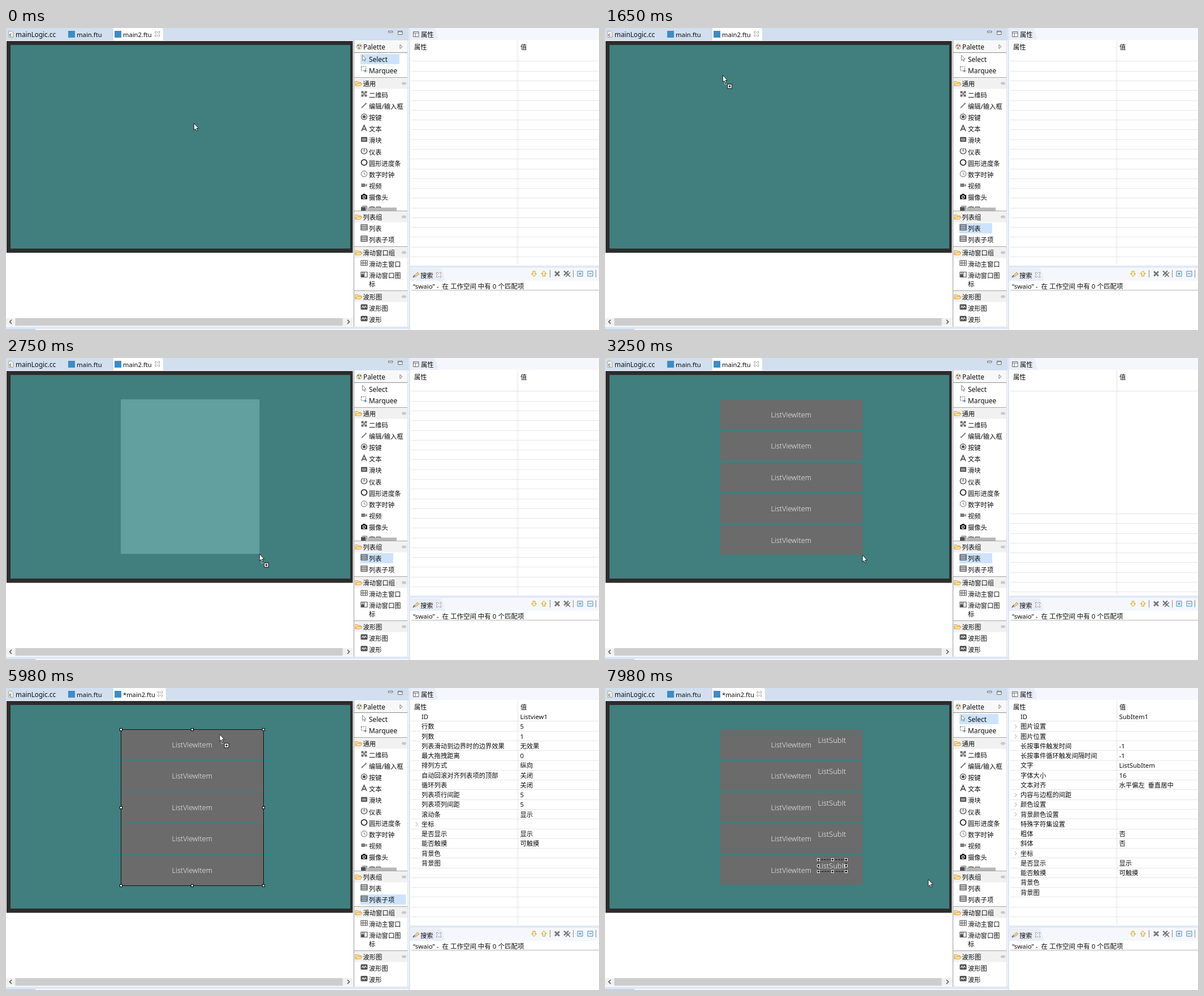
An HTML page that plays this animation: 1049 by 534 pixels, repeating every 8 s.

```html
<!DOCTYPE html>
<html lang="zh-CN">
<head>
<meta charset="utf-8">
<title>List designer</title>
<style>
html, body { margin: 0; width: 100%; height: 100%; overflow: hidden; background: #fff; }
svg { display: block; width: 1049px; height: 534px; }
text { font-family: "Noto Sans", "Noto Sans CJK SC", sans-serif; white-space: pre; fill: #0c0c0c; }
.row text { font-family: "Open Sans", "Noto Sans", sans-serif; font-weight: 300; fill: #fff; }
.handle { fill: #fff; stroke: #000; }
#subSel .handle { fill: #000; stroke: #fff; }
.ic { fill: none; stroke: #505050; stroke-width: 1.1; }
.f { fill: #505050; stroke: none; }
</style>
</head>
<body>
<svg id="stage" viewBox="0 0 1049 534"></svg>
<script>
const LOOP = 8000;
const PITCH = 55.5;
const five = [0, 1, 2, 3, 4];

// ---------- drawing helpers ----------
const rect = (x, y, w, h, fill, more = '') => `<rect x="${x}" y="${y}" width="${w}" height="${h}" fill="${fill}" ${more}/>`;
const text = (x, mid, s, size = 11.3) => `<text x="${x}" y="${mid + 4.5}" font-size="${size}">${s}</text>`;
const path = (d, fill = 'none', stroke = 'none', w = 1) => `<path d="${d}" fill="${fill}" stroke="${stroke}" stroke-width="${w}"/>`;
const hline = (x1, x2, y, c) => path(`M${x1} ${y}H${x2}`, 'none', c);
const vline = (x, y1, y2, c) => path(`M${x} ${y1}V${y2}`, 'none', c);
const at = (x, y, s) => `<g transform="translate(${x} ${y})">${s}</g>`;
const group = (id, s, cls = '') => `<g id="${id}" class="${cls}">${s}</g>`;
const closeMark = path('M-4 -4H-2L0 -2 2 -4H4V-2L2 0 4 2V4H2L0 2 -2 4H-4V2L-2 0 -4 -2Z', '#fff', '#8a8a8a', .9);
const handles = pts => pts.map(([x, y]) => `<rect class="handle" x="${x - 2}" y="${y - 2}" width="4" height="4"/>`).join('');

// ---------- palette icons, centred on 0,0 ----------
const icons = {
  code: '<path class="f" d="M-5 -5h4v4h-4zM1 -5h4v4h-4zM-5 1h4v4h-4zM1 1h4v4h-4zM-1 -2h2v4h-2z" opacity=".85"/>',
  edit: '<path d="M-4 4L3 -3" stroke-width="2.2" stroke="#888"/><path d="M-5 5l1 -3 2 2zM3 -5l2 2 -1 1 -2 -2z" fill="#777" stroke="none"/>',
  button: '<circle r="5" stroke-width="1.3"/><circle class="f" r="2.6"/>',
  letter: '<path d="M-4.5 5L0 -5 4.5 5M-3 1.8H3" stroke-width="1.7"/>',
  slider: '<rect class="f" x="-5.5" y="-4.5" width="11" height="8.5" rx="1"/><path d="M-2.5 -2v4M0 -2v4M2.5 -2v4" stroke="#fff"/>',
  gauge: '<path d="M-2.5 -4.6A5.2 5.2 0 1 0 2.5 -4.6M0 -5.5V1" stroke-width="1.4"/>',
  ring: '<circle r="5" stroke="#111" stroke-width="1.6"/>',
  clock: '<path d="M-2 -5H2L5 -2V2L2 5H-2L-5 2V-2ZM0 -3V0L2.5 1.5" stroke="#888"/>',
  video: '<path d="M-5 -3H2V3H-5ZM2 0L5 -3V3Z" fill="#777" stroke="none"/>',
  camera: '<path d="M-5.5 -3H-3L-2 -5H2L3 -3H5.5V4.5H-5.5Z" fill="#111" stroke="none"/><circle r="2.2" cy=".6" stroke="#fff" stroke-width="1.2"/>',
  windows: '<path class="f" d="M-5.5 -2H3V5H-5.5Z"/><path d="M-3.5 -3.5H4.7V4"/>',
  list: '<path d="M-5.5 -4.5H5.5V4.5H-5.5ZM-5.5 -1.5H5.5M-5.5 1.5H5.5" stroke-width="1.3"/>',
  grid: '<path d="M-5.5 -4.5H5.5V4.5H-5.5ZM-5.5 0H5.5M-2 -4.5V4.5M2 -4.5V4.5" stroke-width="1.2"/>',
  tiles: '<path d="M-5.5 -4.5H5.5V4.5H-5.5ZM-5.5 0H0M0 -4.5V4.5M-2.7 -4.5V4.5" stroke-width="1.2"/><path class="f" d="M-5 0h5v4h-5z"/>',
  wave: '<rect class="f" x="-6" y="-5" width="12" height="9.5" rx="1.5"/><path d="M-4 1.5L-2 -2 0 1.5 2 -2 4 1" stroke="#fff"/>',
  select: '<path d="M-3 -5.5V4L-.8 2 .8 5.5 2.2 4.8 .8 1.6H3.5Z" fill="#fff" stroke="#777" stroke-width=".9"/>',
  marquee: '<path d="M-5 -5H3V2H-5Z" stroke="#666" stroke-dasharray="2 1.5"/><path d="M2 0V5M0 2.5H5" stroke="#3b74b5"/>'
};
const tool = (y, name, icon) => at(633.5, y - 1.5, `<g class="ic">${icons[icon]}</g>`) + text(642, y, name, /[a-z]/.test(name) ? 11.9 : 11.3);
const folder = path('M-6 4V-3.5H-2L-1 -2H3.5V0M-6 4L-3.5 0H6L3.5 4Z', '#fde9b0', '#d79a38');
const pin = path('M-4 0L-1.5 -2.2V2.2ZM4 0L1.5 -2.2V2.2ZM-1.5 -1H1.5M-1.5 1H1.5', '#fff', '#a2a2a2', .8);
const section = (y, name) => rect(616, y - 10.5, 94, 20, '#f1f1f1') + hline(616, 710, y - 10.5, '#a5a5a5') +
  at(624, y, folder) + text(631.5, y, name) + at(704, y, pin);

function palette() {
  const common = '二维码 code|编辑/输入框 edit|按键 button|文本 letter|滑块 slider|仪表 gauge|圆形进度条 ring|数字时钟 clock|视频 video|摄像头 camera|窗口 windows';
  const items = common.split('|').map((s, i) => tool(118 + 20.2 * i, ...s.split(' '))).join('');
  return rect(615, 22, 97, 506, '#fff') + vline(615.5, 22, 528, '#9a9a9a') + vline(710.5, 22, 528, '#dcdcdc') +
    rect(616, 23, 94, 20, '#f8f8f8') + hline(616, 710, 43.5, '#8c8c8c') +
    at(625, 33, '<circle r="4.6" fill="#f3ead6" stroke="#a39a88" stroke-width=".8"/><circle cx="-2" cy="-2" r="1.4" fill="#3c78c0"/><circle cx="2" cy="-1.5" r="1.4" fill="#d1503c"/><circle cx="-.5" cy="2.3" r="1.4" fill="#4f9d4a"/>') +
    text(632, 33, 'Palette', 11.9) + path('M697 29.5L701 33 697 36.5Z', '#fff', '#777') +
    group('hlSelect', rect(627, 46, 69, 18, '#cde3fb')) +
    group('hlList', rect(627, 345, 58, 18, '#cde3fb')) +
    group('hlSub', rect(627, 365, 80.5, 18, '#cde3fb')) +
    tool(55, 'Select', 'select') + tool(75, 'Marquee', 'marquee') +
    section(98, '通用') + items + rect(640, 317.5, 51, 6, '#b7b7b7') + rect(616, 323.5, 94, 6, '#f1f1f1') +
    section(334, '列表组') + tool(354, '列表', 'list') + tool(374, '列表子项', 'list') +
    section(397, '滑动窗口组') + tool(417, '滑动主窗口', 'grid') + tool(437.5, '滑动窗口图', 'tiles') + text(642, 452.5, '标') +
    section(475, '波形图') + tool(495, '波形图', 'wave') + tool(515.5, '波形', 'wave');
}

function editor() {
  return rect(0, 0, 712, 22, '#d1dfef') +
    path('M5 5.5H10L12.5 8V16.5H5Z', '#fff', '#b79a58') + `<text x="6" y="15" font-size="8" style="fill:#2d64ad;font-weight:700">c</text>` +
    text(17, 11, 'mainLogic.cc', 11.7) +
    rect(110, 5, 12, 12, '#3f8cc3') + text(125, 11, 'main.ftu') +
    '<path id="tab" fill="#fff"/>' +
    rect(192, 5, 12, 12, '#3f8cc3') + '<text id="tabName" x="207" y="15.5" font-size="11.2"></text>' +
    group('tabClose', closeMark) +
    path('M676.5 5.5H684V8H676.5Z', '#fff', '#666') + path('M693.5 5.5H701V11.5H693.5ZM693.5 7H701', '#fff', '#666') +
    rect(1, 23, 612.5, 374.5, '#2c2c2c') + rect(8, 30, 601, 360, '#417e7e') +
    rect(0, 513, 614, 13.5, '#f1f1f1') + rect(16.5, 513, 579, 13.5, '#cdcdcd') +
    path('M10 516L6.5 519.5 10 523M604 516L607.5 519.5 604 523', 'none', '#444', 1.4);
}

function sidePanels() {
  const arrow = 'M-2 -4.5H2V0H4.5L0 5 -4.5 0H-2Z';
  const cross = 'M-4 -4L4 4M4 -4L-4 4';
  const box = 'M-4.5 -4.5H4.5V4.5H-4.5ZM-2.5 0H2.5';
  return rect(712, 0, 3, 534, '#dfe7f4') + rect(715, 0, 334, 21, '#f5f7fc') +
    path('M715 21V0H757Q761 0 764 21Z', '#e9eef8') +
    path('M720.5 6.5H730V15.5H720.5ZM720.5 9H730M724 9V15.5', '#fff', '#666') + text(734, 11, '属性') +
    rect(715, 21, 334, 400, '#fff') + text(722, 33, '属性') + text(910, 33, '值') +
    vline(905.5, 22, 418, '#e3e3e3') + hline(717, 1049, 58.5, '#e3e3e3') + '<path id="gridLines" fill="none" stroke="#e6e6e6"/>' +
    rect(712, 420, 337, 4, '#e2e9f5') + rect(715, 424, 334, 23, '#f5f7fc') + path('M715 447V425H768Q773 426 776 447Z', '#e9eef8') +
    path('M721 440L728 432 731 435 724 440Z', '#f6d58a', '#b8924a') + path('M720 441L723 437', 'none', '#5a6ea0', 2) +
    text(733, 437, '搜索') + at(765.5, 436.5, closeMark) +
    at(934, 434.5, path(arrow, '#fff3c0', '#c99b34')) + at(951.5, 434.5, `<g transform="scale(1 -1)">${path(arrow, '#fff3c0', '#c99b34')}</g>`) +
    at(975, 434.5, path(cross, 'none', '#777', 2.8)) + at(991, 433.5, path(cross, 'none', '#777', 2.4)) + at(994, 436, path(cross, 'none', '#777', 1.6)) +
    at(1015.5, 434.5, path(box + 'M0 -2.5V2.5', '#eaf4fd', '#4a86b8')) + at(1033.5, 434.5, path(box, '#eaf4fd', '#4a86b8')) +
    [962.5, 1003.5, 1043.5].map(x => vline(x, 428, 441, '#888')).join('') +
    rect(715, 447, 334, 87, '#fff') + text(720, 456, '“swaio” -  在 工作空间 中有 0 个匹配项', 11.5) + hline(717, 1049, 463.5, '#b5b5b5') +
    rect(0, 528, 715, 6, '#dfe7f4') + rect(0, 532, 52, 2, '#c4d5ec') + rect(52, 532, 660, 2, '#f5f7fc');
}

// A leading ">" marks an expandable property
const props = list => list.split('|').map((s, i) => {
  const y = 50.5 + 17.25 * i, [name, value = ''] = s.replace(/^>/, '').split('=');
  return (s[0] === '>' ? path(`M725 ${y - 3}L728 ${y + .5} 725 ${y + 4}`, 'none', '#999') : '') + text(735, y, name) + text(909.5, y, value);
}).join('');
const listProps = 'ID=Listview1|行数=5|列数=1|列表滑动到边界时的边界效果=无效果|最大拖拽距离=0|排列方式=纵向|自动回滚对齐列表项的顶部=关闭|循环列表=关闭|列表项行间距=5|列表项列间距=5|滚动条=显示|>坐标|是否显示=显示|能否触摸=可触摸|背景色|背景图';
const subProps = 'ID=SubItem1|>图片设置|>图片位置|长按事件触发时间=-1|长按事件循环触发间隔时间=-1|文字=ListSubItem|字体大小=16|文本对齐=水平偏左  垂直居中|>内容与边框的间距|>颜色设置|>背景颜色设置|特殊字符集设置|粗体=否|斜体=否|>坐标|是否显示=显示|能否触摸=可触摸|背景色|背景图';

const rows = five.map(i => at(0, PITCH * i, '<rect class="cell" x="204" width="251.5" fill="#6b6b6b"/>' + text(293.5, 100, 'ListViewItem', 12.75))).join('');
const subTexts = five.map(i => text(376.5, 92.3 + PITCH * i, 'ListSubIt', 12.9)).join('');
const ringPts = (x, y, w, h) => [[0, 0], [.5, 0], [1, 0], [0, .5], [1, .5], [0, 1], [.5, 1], [1, 1]].map(([a, b]) => [Math.floor(x + w * a) + .5, Math.floor(y + h * b) + .5]);

const stage = document.getElementById('stage');
stage.innerHTML = rect(0, 0, 1049, 534, '#fff') + editor() + palette() + sidePanels() +
  group('listProps', props(listProps)) + group('subProps', props(subProps)) +
  group('rows', rows, 'row') + group('subTexts', subTexts, 'row') +
  group('listSel', rect(203.5, 73.5, 252, 276, 'none', 'stroke="#111"') + handles(ringPts(203.5, 73.5, 252, 276))) +
  group('subSel', rect(377.5, 303.5, 49, 21, 'none', 'stroke="#000" stroke-dasharray="3 2"') + handles(ringPts(377.5, 303.5, 49, 21))) +
  '<rect id="ghost" fill="#84c0c0" fill-opacity=".5" stroke="#7fa3a3" stroke-dasharray="1 1"/>' +
  group('cursor',
    group('plus', path('M3.5 16.5H8M3.5 12V16.5', 'none', '#9bb', 1) + rect(8.8, 16.3, 7.6, 7.6, '#fff', 'stroke="#111"') + path('M10.5 20.1H14.7M12.6 18V22.2', 'none', '#111', 1.4)) +
    path('M.4 .4V12.8L3.1 10.2 5 14.4 6.9 13.5 5 9.4H8.7Z', '#fff', '#111', .9));

// ---------- motion ----------
// [first step, last step, number of steps, x, y]
const moves = [
  [50, 700, 11, 622, 359], [765, 830, 2, 630, 355], [900, 980, 2, 636, 353],
  [1280, 1650, 7, 208, 83], [1720, 1790, 2, 203, 73],
  [1970, 2350, 7, 430, 319], [2415, 2750, 6, 448, 346], [2820, 2820, 1, 455, 348],
  [3930, 3990, 2, 447, 343], [4055, 4700, 11, 642, 372],
  [4950, 5650, 11, 392, 88], [5720, 5980, 5, 377.5, 81.5],
  [6290, 6950, 11, 426, 101], [7790, 7980, 4, 571.5, 338]
];
const ease = f => f * f * (3 - 2 * f);

function cursorAt(t) {
  let x = 332, y = 168;
  for (const [t0, t1, n, tx, ty] of moves) {
    if (t < t0) break;
    const k = n > 1 ? Math.floor((t - t0) / (t1 - t0) * (n - 1) + .01) : 0;
    const f = ease(Math.min(1, (k + 1) / n));
    x += (tx - x) * f;
    y += (ty - y) * f;
  }
  return [x, y];
}

const $ = id => document.getElementById(id);
const show = (id, on) => $(id).style.display = on ? '' : 'none';
const set = (id, attrs) => Object.entries(attrs).forEach(([k, v]) => $(id).setAttribute(k, v));
const cells = document.querySelectorAll('.cell');

function gridPath(first) {
  let d = '';
  for (let y = first; y < 417; y += 17.27) d += `M717 ${Math.round(y) + .5}H1049`;
  return d;
}
const fullGrid = gridPath(75.8), partGrid = gridPath(275);

function draw(t) {
  const between = (a, b) => t >= a && t < b;
  const [x, y] = cursorAt(t);
  const active = between(1210, 3420) ? 'list' : between(4880, 7110) ? 'sub' : 'select';
  const hover = (a, b) => x > 626 && y >= a && y < b;

  set('cursor', { transform: `translate(${x} ${y})` });
  show('plus', x < 614 && (between(1210, 3250) || between(4880, 7110)));
  show('hlSelect', active === 'select');
  show('hlList', active === 'list' || hover(345, 363));
  show('hlSub', active === 'sub' || hover(365, 383));

  const listDrag = between(1970, 3250), subDrag = between(6290, 7110);
  const [gx, gy] = listDrag ? [203.5, 73.5] : [377.5, 82];
  show('ghost', listDrag || subDrag);
  set('ghost', { x: gx, y: gy, width: Math.max(0, x - gx), height: Math.max(0, y - gy) });

  const listSel = between(3420, 7110);
  show('rows', t >= 3250);
  show('listSel', listSel);
  show('subTexts', t >= 7110);
  show('subSel', t >= 7110);
  cells.forEach(c => {
    c.setAttribute('y', listSel ? 73.3 : 74);
    c.setAttribute('height', listSel ? 53.2 : 51.6);
  });

  show('listProps', between(3450, 7190));
  show('subProps', t >= 7190);
  set('gridLines', { d: between(3250, 3450) ? partGrid : fullGrid });

  const dirty = t >= 3420, right = dirty ? 283 : 278;
  $('tabName').textContent = dirty ? '*main2.ftu' : 'main2.ftu';
  set('tab', { d: `M190 22V0H${right - 3}Q${right} 0 ${right} 4V22Z` });
  set('tabClose', { transform: `translate(${right - 10.2} 10.5)` });
}

const start = performance.now();
function tick(now) {
  draw(Math.max(0, now - start) % LOOP);
  requestAnimationFrame(tick);
}
draw(0);
requestAnimationFrame(tick);
</script>
</body>
</html>
```
